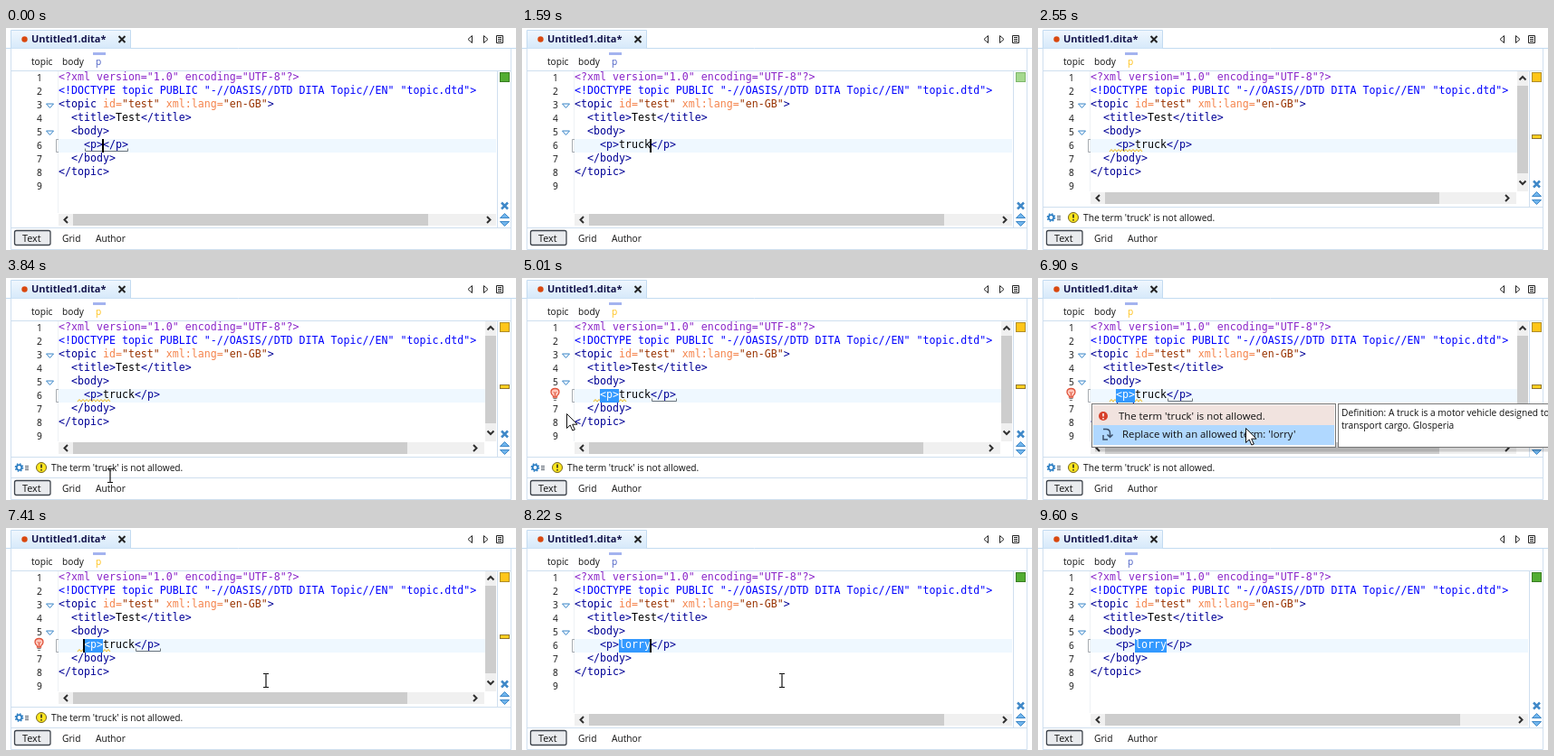
These frames come from a looping animation (563 px wide and 246 px high, 9.69 s). An HTML page:

```html
<!DOCTYPE html>
<html lang="en">
<head>
<meta charset="utf-8">
<title>Editor quick fix</title>
<style>
  html, body { margin: 0; width: 100%; height: 100%; overflow: hidden; background: #fff; }
  svg { display: block; width: 563px; height: 246px; }
  text { white-space: pre; }
  .ui { font: 10.2px "Open Sans", "Noto Sans", sans-serif; fill: #111; }
  .menu { font-size: 11.35px; }
  .code { font: 11.627px "DejaVu Sans Mono", "Noto Sans Mono", monospace; fill: #000; }
  .pi { fill: #8b26c9; }
  .doctype { fill: #0000ff; }
  .tag { fill: #000096; }
  .attr { fill: #f5844c; }
  .value { fill: #993300; }
  .track { fill: #f0f0f0; }
  .thumb { fill: #cdcdcd; }
  .chevron { fill: none; stroke: #303030; stroke-width: 2; }
  .frame { fill: none; stroke: #cfdfef; }
  .line { fill: none; stroke: #6c747c; }
</style>
</head>
<body>
<svg viewBox="0 0 563 246">
  <defs>
    <linearGradient id="tabFill" x2="0" y2="1">
      <stop stop-color="#f0f7fe"/><stop offset="1" stop-color="#d6e9fa"/>
    </linearGradient>
  </defs>

  <!-- Title tab and toolbar -->
  <path d="M0 22.5H563" stroke="#c3dbf1"/>
  <path d="M5.5 22.5V2.5H137.500V22.500" fill="url(#tabFill)" stroke="#c3dbf1"/>
  <circle cx="20.500" cy="12.500" r="3.200" fill="#d9480f"/>
  <text class="ui" x="28" y="16" style="font-size:11px;font-weight:700;fill:#14144b">Untitled1.dita*</text>
  <path d="M124.500 9l7 7m0-7l-7 7" stroke="#222" stroke-width="2"/>
  <g fill="none" stroke="#222">
    <path d="M514.500 8.500v8l-4.500-4z"/>
    <path d="M527.500 8.500v8l4.500-4z"/>
    <path d="M541.500 8.500h7v8h-7zM543 10.500h4M543 12.500h4M543 14.500h4"/>
  </g>

  <!-- Breadcrumb and panel -->
  <path class="frame" d="M5.500 23V245.500H557.500V23M6 47.500H557M6 221.500H557"/>
  <g class="ui">
    <text x="28" y="41">topic</text>
    <text x="62" y="41">body</text>
    <text x="99" y="41" id="crumb">p</text>
  </g>
  <path d="M96 28.500h14" stroke="#a3b3ef" stroke-width="3"/>

  <!-- Editor -->
  <path d="M57.500 48V205" stroke="#eef1f5"/>
  <rect x="58" y="123" width="483" height="15" fill="#eff8ff"/>
  <path class="line" d="M58 123.500h-2.500v14H58" stroke-opacity=".6"/>
  <g class="ui" id="numbers"></g>
  <g fill="#eef6ff" stroke="#3c87c7">
    <path d="M44.500 84h8l-4 4.500z"/>
    <path d="M44.500 114h8l-4 4.500z"/>
  </g>
  <path id="squiggle" fill="none" stroke="#f0b81c"/>
  <rect id="selection" y="123" height="15" fill="#3399ff"/>
  <g class="code">
    <text class="pi" x="58" y="58">&lt;?xml version="1.0" encoding="UTF-8"?&gt;</text>
    <text class="doctype" x="58" y="73">&lt;!DOCTYPE topic PUBLIC "-//OASIS//DTD DITA Topic//EN" "topic.dtd"&gt;</text>
    <text class="tag" x="58" y="88">&lt;topic <tspan class="attr">id=</tspan><tspan class="value">"test"</tspan> <tspan class="attr">xml:lang=</tspan><tspan class="value">"en-GB"</tspan>&gt;</text>
    <text class="tag" x="72" y="103">&lt;title&gt;<tspan fill="#000">Test</tspan>&lt;/title&gt;</text>
    <text class="tag" x="72" y="118">&lt;body&gt;</text>
    <text class="tag" x="86" y="133"><tspan id="openTag">&lt;p&gt;</tspan><tspan id="word"></tspan>&lt;/p&gt;</text>
    <text class="tag" x="72" y="148">&lt;/body&gt;</text>
    <text class="tag" x="58" y="163">&lt;/topic&gt;</text>
  </g>
  <path id="emptyPair" class="line" d="M87.500 133.500v3h47v-3"/>
  <path id="closeMark" class="line" d="M143.500 133.500v3h27v-3"/>
  <g id="bulb">
    <rect x="31" y="122" width="12" height="15" fill="#fff"/>
    <path d="M34.500 132v-1.500Q32 129 32 126.500Q32 122.500 36.500 122.500T41 126.500Q41 129 38.500 130.500V132z" fill="#ffc9bd" stroke="#e0543c" stroke-width="1.300"/>
    <path d="M35 126l1.500 2 1.500-2M36.500 128v4" fill="none" stroke="#e0543c"/>
    <path d="M34.500 133.500h4M35 135.500h3" stroke="#777"/>
  </g>
  <rect id="caret" y="123" width="2" height="15"/>

  <!-- Scrollbars -->
  <path class="frame" d="M542.500 48V221"/>
  <g id="wideBar">
    <rect class="track" x="58" y="206" width="483" height="13"/>
    <rect class="thumb" x="74" y="206" width="392" height="13"/>
    <path class="chevron" d="M68 209l-3.500 3.500 3.500 3.500M531 209l3.500 3.500-3.500 3.500"/>
  </g>
  <g id="warningPanel">
    <rect x="6" y="181" width="551" height="40" fill="#fff"/>
    <rect class="track" x="58" y="182" width="470" height="13"/>
    <rect class="thumb" x="74" y="182" width="369" height="13"/>
    <path class="chevron" d="M68 185l-3.500 3.500 3.500 3.500M516 185l3.500 3.500-3.500 3.500"/>
    <rect class="track" x="529" y="48" width="12" height="133"/>
    <rect class="thumb" x="529" y="64" width="12" height="97"/>
    <path class="chevron" d="M531.500 57.500l3.500-3.500 3.500 3.500M531.500 169.500l3.500 3.500 3.500-3.500"/>
    <path class="frame" d="M542.500 181V198M6 198.500H557"/>
    <circle cx="14.500" cy="210" r="2.800" fill="none" stroke="#2d7fc4" stroke-width="1.800"/>
    <circle cx="14.500" cy="210" r="4.200" fill="none" stroke="#2d7fc4" stroke-width="1.300" stroke-dasharray="1.650 1.650"/>
    <path d="M21 208.500h4M21 210.500h4M21 212.500h4" stroke="#56606c"/>
    <circle cx="39" cy="210" r="5.500" fill="#ffe71f" stroke="#75651a"/>
    <path d="M39 206.500v4M39 212v1.500" stroke="#222" stroke-width="1.500"/>
    <text class="ui" x="50" y="214">The term 'truck' is not allowed.</text>
  </g>

  <!-- Overview ruler -->
  <rect id="status" x="545.500" y="49.500" width="10" height="10"/>
  <rect id="marker" x="545.500" y="118.500" width="10" height="4" fill="#ffcf20" stroke="#8f7630"/>
  <g id="rulerButtons" fill="#71b5ec" stroke="#3f88c8">
    <path d="M547 193.500l7 7m0-7l-7 7" stroke-width="2.500"/>
    <path d="M545.500 210.500h10l-5-5zM545.500 214.500h10l-5 5z"/>
  </g>

  <!-- Mode tabs -->
  <rect x="9.500" y="224.500" width="39.500" height="16" rx="2" fill="#e9ebee" stroke="#3f454d" stroke-width="1.300"/>
  <g class="ui">
    <text x="18" y="237" style="font-size:10.800px">Text</text>
    <text x="62" y="237">Grid</text>
    <text x="99" y="237">Author</text>
  </g>

  <!-- Quick fix popup -->
  <g id="popup">
    <path d="M63 190H563" stroke="#000" stroke-opacity=".14" stroke-width="5"/>
    <rect x="59.500" y="139.500" width="269" height="48" fill="#f5f5f5" stroke="#777"/>
    <rect x="61" y="141" width="266" height="22" fill="#f1e3df"/>
    <rect x="61" y="163" width="266" height="22" fill="#b0d8ff"/>
    <circle cx="72" cy="153" r="5" fill="#d7402a"/>
    <path d="M72 150v3.500M72 155v1.500" stroke="#fff" stroke-width="1.500"/>
    <path d="M72 167.500h3q4.500 0 4.500 4.500v4m-3-2.500l3 3 3-3M72 174v5h5" fill="none" stroke="#3c4f69" stroke-width="1.500"/>
    <text class="ui menu" x="89" y="157">The term 'truck' is not allowed.</text>
    <text class="ui menu" x="93" y="177">Replace with an allowed term: 'lorry'</text>
    <rect x="331.500" y="139.500" width="240" height="48" fill="#fff" stroke="#777"/>
    <text class="ui" x="335" y="153">Definition: A truck is a motor vehicle designed to</text>
    <text class="ui" x="335" y="167">transport cargo. Glosperia</text>
  </g>

  <g id="mouse">
    <path id="beam" d="M-3-7.500h2.500l.5.500.5-.500H3M0-7V7M-3 7.500h2.500l.5-.500.5.500H3" fill="none" stroke="#111" stroke-width="1.200"/>
    <path id="arrow" d="M.5.500v16l3.700-3.500 2.600 6 2.500-1-2.600-5.800h5.300z" fill="#fff" stroke="#111"/>
    <path id="hand" d="M-1.500 12V1.500Q0-.500 1.500 1.500V7Q3.500 5.500 4.500 7.500 6.500 6.500 7.500 8.500 10 7.500 10.500 10V15L8.500 18.500V21.500H-.5V19L-5.500 12.500Q-5.500 9.500-3 10.500z" fill="#fff" stroke="#111"/>
  </g>
</svg>

<script>
const LOOP = 9690, TICK = 30;
const $ = id => document.getElementById(id);
const show = (id, on) => $(id).style.display = on ? "" : "none";
const column = n => 58 + 7 * n;

// Each time flips the caret, which starts out visible.
const blinks = [300, 600, 1920, 2220, 2550, 2880, 3180, 3510, 3840, 4050, 4380, 4680,
  5010, 5340, 5670, 7410, 7890, 8190, 8520, 8850, 9180, 9480, 9600];
const keystrokes = [810, 1020, 1200, 1410, 1590];

// time, x, y
const mousePath = [
  [3180, 99, 254], [3510, 115, 219], [4650, 115, 219], [5010, 49, 150], [5340, 33, 131],
  [6150, 33, 131], [6420, 62, 154], [7080, 291, 171], [7200, 287, 169],
  [8490, 287, 169], [8850, 295, 217]
];

function mouseAt(t) {
  const i = mousePath.findIndex(p => p[0] > t);
  const [t0, x0, y0] = mousePath[i - 1], [t1, x1, y1] = mousePath[i];
  const k = (t - t0) / (t1 - t0);
  return [x0 + (x1 - x0) * k, y0 + (y1 - y0) * k];
}

function drawMouse(t, popup) {
  const visible = t >= 3180 && t < 8850;
  show("mouse", visible);
  if (!visible) return;
  const [x, y] = mouseAt(t).map(Math.round);
  const kind = x < 42 && y < 138 ? "hand" : popup || x < 57 ? "arrow" : "beam";
  for (const id of ["beam", "arrow", "hand"]) show(id, id === kind);
  $("mouse").setAttribute("transform", `translate(${x} ${y})`);
}

function draw(t) {
  const typed = keystrokes.filter(k => k <= t).length;
  const tagSelected = t >= 4050 && t < 7560;
  const replaced = t >= 7560;
  const panel = t >= 2310 && t < 8220;
  const problem = panel && !replaced;
  const popup = t >= 5730 && t < 7410;

  $("word").textContent = replaced ? "lorry" : "truck".slice(0, typed);
  $("word").style.fill = replaced ? "#fff" : "#000";
  $("openTag").style.fill = tagSelected ? "#fff" : "";
  show("selection", tagSelected || replaced);
  $("selection").setAttribute("x", column(replaced ? 7 : 4));
  $("selection").setAttribute("width", replaced ? 35 : 21);

  show("caret", blinks.filter(b => b <= t).length % 2 === 0);
  $("caret").setAttribute("x", column(tagSelected ? 4 : replaced ? 12 : 7 + typed) - 1);

  show("emptyPair", !typed);
  show("closeMark", t >= 4110 && tagSelected);
  show("squiggle", problem);
  show("marker", problem);
  show("bulb", t >= 4380 && t < 7890);
  show("warningPanel", panel);
  show("wideBar", !panel);
  show("popup", popup);
  $("rulerButtons").setAttribute("transform", `translate(0 ${panel ? -24 : 0})`);

  const settled = !typed || t >= 8220;
  $("status").style.fill = problem ? "#ffc61a" : settled ? "#53ad32" : "#a5d98f";
  $("status").style.stroke = problem ? "#b08d28" : settled ? "#397d23" : "#7db66b";
  $("crumb").style.fill = panel ? "#ffc21a" : "#4a5fc4";
  drawMouse(t, popup);
}

$("numbers").innerHTML = Array.from({ length: 9 }, (_, i) =>
  `<text x="34" y="${59 + 15 * i}">${i + 1}</text>`).join("");
$("squiggle").setAttribute("d", "M79 137" + "l2-2.500 2 2.500".repeat(9));

const start = performance.now();
function frame() {
  const t = (performance.now() - start) % LOOP;
  draw(Math.floor(t / TICK) * TICK);
  requestAnimationFrame(frame);
}
frame();
</script>
</body>
</html>
```
